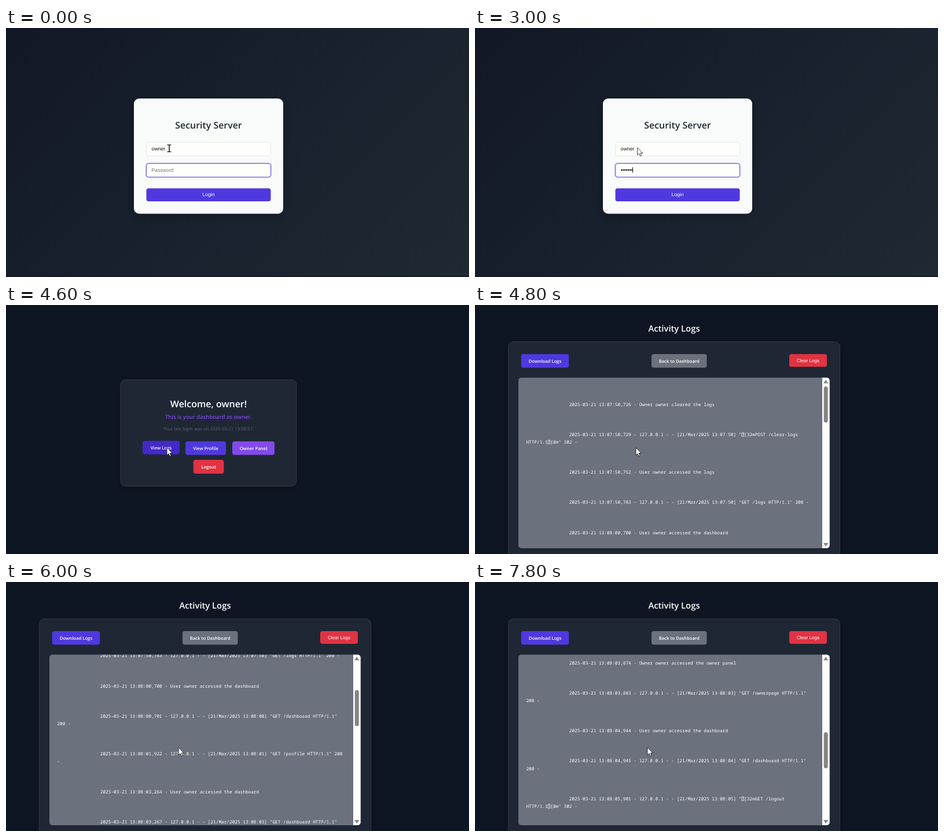
Recreate the animation shown at these times as an HTML page with a canvas. Size 800 by 431 pixels, loop 8 s.

```html
<!DOCTYPE html>
<html lang="en">
<head>
<meta charset="utf-8">
<title>Security Server</title>
<style>
html, body { margin: 0; width: 100%; height: 100%; overflow: hidden; background: #0f1623; }
canvas { display: block; width: 800px; height: 431px; }
</style>
</head>
<body>
<canvas id="stage" width="800" height="431"></canvas>
<script>
const ctx = document.getElementById('stage').getContext('2d');
const LOOP = 8000, STEP = 200;
const SANS = '"Open Sans", "Noto Sans", sans-serif';
const ARIAL = '"Liberation Sans", Arial, sans-serif';
const MONO = '"Noto Sans Mono", "DejaVu Sans Mono", monospace';
const INDIGO = '#4f39de', RED = '#e03343', GREY = '#6b717d';
const USER = 'owner';

// Value at time t from [time, value] points, straight between them
function track(points, t) {
  let prev = points[0];
  for (const p of points) {
    if (t < p[0]) {
      return prev[1] + (p[1] - prev[1]) * Math.max(0, (t - prev[0]) / (p[0] - prev[0]));
    }
    prev = p;
  }
  return prev[1];
}

// Last value whose time has been reached
const hold = (points, t) => points.filter(p => p[0] <= t).pop()[1];

function box(x, y, w, h, r, fill, stroke, lineWidth = 1) {
  ctx.beginPath();
  ctx.roundRect(x, y, w, h, r);
  if (fill) { ctx.fillStyle = fill; ctx.fill(); }
  if (stroke) { ctx.strokeStyle = stroke; ctx.lineWidth = lineWidth; ctx.stroke(); }
}

function card(x, y, w, h, fill, stroke) {
  ctx.save();
  ctx.shadowColor = 'rgba(0,0,0,.28)';
  ctx.shadowBlur = 14;
  ctx.shadowOffsetY = 4;
  box(x, y, w, h, 9, fill);
  ctx.restore();
  if (stroke) box(x, y, w, h, 9, null, stroke);
}

// Laid out large and scaled down, so small type keeps exact spacing
function text(str, x, y, size, color, { font = SANS, weight = 400, align = 'left' } = {}) {
  const k = 8;
  ctx.save();
  ctx.translate(x, y);
  ctx.scale(1 / k, 1 / k);
  ctx.font = `${weight} ${size * k}px ${font}`;
  ctx.textRendering = 'geometricPrecision';
  ctx.textAlign = align;
  ctx.fillStyle = color;
  ctx.fillText(str, 0, 0);
  ctx.restore();
}

const heading = (str, x, y, size, color) =>
  text(str, x, y, size, color, { weight: 600, align: 'center' });

function button(label, x, y, w, h, fill) {
  box(x, y, w, h, 4, fill);
  heading(label, x + w / 2, y + h / 2 + 3.2, 7.7, '#fff');
}

function arrow(x, y) {
  const pts = [[0, 0], [0, 13], [3, 10.2], [5, 14.8], [7.1, 13.9], [5.2, 9.5], [9.2, 9.5]];
  ctx.beginPath();
  pts.forEach(([dx, dy]) => ctx.lineTo(x + dx, y + dy));
  ctx.closePath();
  ctx.fillStyle = '#fff';
  ctx.fill();
  ctx.strokeStyle = '#111';
  ctx.lineWidth = .8;
  ctx.stroke();
}

function beam(x, y) {
  ctx.fillStyle = '#111';
  ctx.fillRect(x - .7, y - 6, 1.5, 12.5);
  ctx.fillRect(x - 3.5, y - 6.3, 7, 1.2);
  ctx.fillRect(x - 3.5, y + 5.6, 7, 1.2);
}

const DOTS = [[0, 0], [400, 1], [800, 2], [1200, 3], [2200, 4], [3000, 7]];

function login(t) {
  // 135 degree gradient across the stage
  const d = (800 + 431) / 4;
  const bg = ctx.createLinearGradient(400 - d, 215.5 - d, 400 + d, 215.5 + d);
  bg.addColorStop(0, '#121726');
  bg.addColorStop(.5, '#18212d');
  bg.addColorStop(1, '#1f2933');
  ctx.fillStyle = bg;
  ctx.fillRect(0, 0, 800, 431);
  ctx.fillStyle = 'rgba(18,23,38,.6)';
  ctx.fillRect(0, 429, 800, 2);

  card(221, 122, 258, 199.5, '#f9fafa');
  heading('Security Server', 350, 174, 15.9, '#1f2933');

  box(242.5, 198, 215, 23.5, 4, '#fefefb', '#e4e6e8');
  text(USER, 251.6, 212.2, 8.65, '#111', { font: ARIAL });

  box(242.5, 234.5, 215, 23.5, 4, null, 'rgba(79,57,222,.22)', 3.5);
  box(242.5, 234.5, 215, 23.5, 4, '#fefefb', '#6455d6');
  const n = hold(DOTS, t);
  if (n) {
    ctx.fillStyle = '#111';
    for (let i = 0; i < n; i++) {
      ctx.beginPath();
      ctx.arc(253.3 + i * 2.93, 245.8, 1.25, 0, 7);
      ctx.fill();
    }
    ctx.fillRect(251.6 + n * 2.93, 241, 1, 9.5);
  } else {
    text('Password', 251.6, 248.8, 8.65, '#757575', { font: ARIAL });
  }

  box(242.5, 277.5, 215, 22.5, 4, INDIGO);
  text('Login', 350, 291.3, 8.65, '#fff', { font: ARIAL, align: 'center' });

  if (t < 3000) beam(282, 208);
  else arrow(280.6, 207);
}

function night() {
  ctx.fillStyle = '#0f1623';
  ctx.fillRect(0, 0, 800, 431);
}

function dashboard(t) {
  night();
  card(198, 129.5, 304, 184, '#1f2735', '#343c49');
  heading('Welcome, ' + USER + '!', 350, 177, 16, '#fff');
  heading('This is your dashboard as ' + USER + '.', 350, 197, 9.5, '#7d45e6');
  text('Your last login was on 2025-03-21 13:08:51.', 350, 216.5, 7.8, '#5c6572', { align: 'center' });

  const over = t >= 4000;
  button('View Logs', 236, over ? 235 : 236, 64, 23.5, over ? '#4329c8' : INDIGO);
  button('View Profile', 310, 236, 70, 23.5, INDIGO);
  button('Owner Panel', 391, 236, 73, 23.5, '#824ae8');
  button('Logout', 323.7, 268, 52.7, 24, RED);

  arrow(track([[3400, 280.6], [4000, 278]], t), track([[3400, 207], [4000, 247]], t));
}

// Log entries: a request wraps after "|"; "~" is an unprintable character
const request = (time, ms, line) =>
  `${time},${ms} - 127.0.0.1 - - [21/Mar/2025 ${time}] "${line} -`;
const access = (time, ms, what = 'dashboard', role = 'User') =>
  `${time},${ms} - ${role} ${USER} accessed the ${what}`;

const LOG = [
  `13:07:50,726 - Owner ${USER} cleared the logs`,
  request('13:07:50', 729, '~[32mPOST /clear-logs|HTTP/1.1~[0m" 302'),
  access('13:07:50', 752, 'logs'),
  request('13:07:50', 783, 'GET /logs HTTP/1.1" 200'),
  access('13:08:00', 700),
  request('13:08:00', 701, 'GET /dashboard HTTP/1.1"|200'),
  request('13:08:01', 922, 'GET /profile HTTP/1.1" 200').replace(/ -$/, '|-'),
  access('13:08:03', 264),
  request('13:08:03', 267, 'GET /dashboard HTTP/1.1"|200'),
  access('13:08:03', 874, 'owner panel', 'Owner'),
  request('13:08:03', 883, 'GET /ownerpage HTTP/1.1"|200'),
  access('13:08:04', 944),
  request('13:08:04', 945, 'GET /dashboard HTTP/1.1"|200'),
  request('13:08:05', 901, '~[32mGET /logout|HTTP/1.1~[0m" 302')
];
const CHAR = 4.65, LINE = 13.06;

function logLine(str, x, y) {
  text(str.replace(/~/g, ' '), x, y, CHAR / .6, '#fff', { font: MONO });
  for (let i = str.indexOf('~'); i >= 0; i = str.indexOf('~', i + 1)) {
    const left = x + i * CHAR;
    box(left + .5, y - 6, 3.7, 6.6, 0, null, '#fff', .7);
    text('?', left + 1.1, y - .8, 5, '#fff', { font: MONO });
  }
}

function triangle(x, y, h) {
  ctx.beginPath();
  ctx.moveTo(x - 4.2, y + h);
  ctx.lineTo(x + 4.2, y + h);
  ctx.lineTo(x, y);
  ctx.closePath();
  ctx.fillStyle = '#858585';
  ctx.fill();
}

const SCROLL = [
  [5400, 0], [5600, 60], [5800, 150], [6000, 214], [6600, 217],
  [6800, 290], [7000, 385], [7200, 465], [7400, 465], [7600, 520], [7800, 554.4]
];

function logs(t) {
  const scroll = track(SCROLL, t);
  night();
  heading('Activity Logs', 344, 46, 14.8, '#fff');
  card(57.5, 63.5, 573, 400, '#1f2735', '#303846');

  button('Download Logs', 79.7, 85, 82.5, 23.5, INDIGO);
  button('Back to Dashboard', 305, 85, 95.5, 23.5, GREY);
  box(543, 85, 65, 22, 4, RED);
  text('Clear Logs', 575.5, 99, 8.1, '#fff', { font: ARIAL, align: 'center' });

  ctx.save();
  ctx.beginPath();
  ctx.roundRect(75, 125.7, 537.7, 295.3, 5);
  ctx.clip();
  ctx.fillStyle = GREY;
  ctx.fillRect(75, 125, 538, 297);
  let y = 174.7 - scroll;
  for (const entry of LOG) {
    const [first, rest] = ('2025-03-21 ' + entry).split('|');
    logLine(first, 88.4 + 16 * CHAR, y);
    if (rest) {
      y += LINE;
      logLine(rest, 88.4, y);
    }
    y += 4 * LINE;
  }
  ctx.fillStyle = '#fdfefd';
  ctx.fillRect(600, 125, 13, 297);
  triangle(606.2, 129.5, 6);
  triangle(606.2, 418, -6);
  box(602.7, 141 + scroll * .2145, 7, 62.5, 3.5, '#858585');
  ctx.restore();

  arrow(track([[4800, 278], [5400, 298]], t), track([[4800, 247], [5400, 286.5]], t));
}

function draw(now) {
  const t = Math.floor(now % LOOP / STEP) * STEP;
  if (t < 3400) login(t);
  else if (t < 4800) dashboard(t);
  else logs(t);
}

const start = performance.now();
function tick() {
  draw(performance.now() - start);
  requestAnimationFrame(tick);
}
tick();
</script>
</body>
</html>
```
